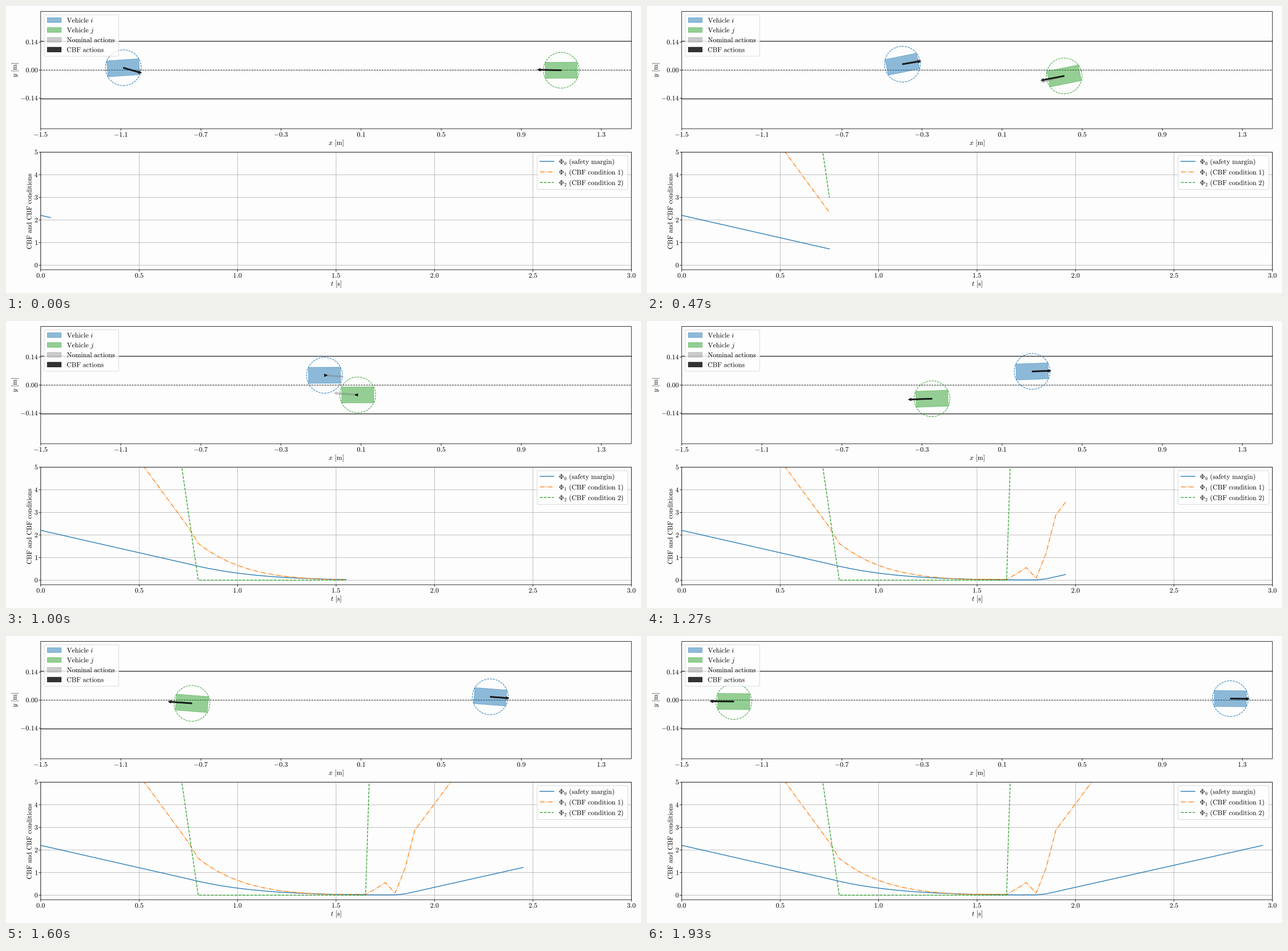
A matplotlib script for the animation above (2000 ms loop, 1112 px wide and 503 px high).

```python
import numpy as np
import matplotlib.pyplot as plt
from matplotlib.animation import FuncAnimation
from matplotlib.patches import FancyBboxPatch, PathPatch, Polygon, Rectangle
from matplotlib.textpath import TextPath
from matplotlib.transforms import Affine2D

plt.rcParams["mathtext.fontset"] = "cm"
plt.rcParams["path.snap"] = False

W, H = 1112, 503
LEFT, RIGHT = 60.8, 1095.2
ROAD_TOP, ROAD_MID, ROAD_BOTTOM = 9.5, 112.3, 215.1
PLOT_TOP, PLOT_BOTTOM = 256.2, 462.2
SCALE = (RIGHT - LEFT) / 2.95          # pixels per metre
FONT = 11.95
BLUE, ORANGE, GREEN = "tab:blue", "tab:orange", "tab:green"
BACK = "#fdfdfd"

# One drawing area in pixels, y pointing down; 72 dpi makes 1 pt = 1 px.
fig = plt.figure(figsize=(W / 72, H / 72), dpi=72, facecolor=BACK)
ax = fig.add_axes([0, 0, 1, 1])
ax.set(xlim=(0, W), ylim=(H, 0))
ax.axis("off")


def road_x(m):
    return LEFT + (m + 1.5) * SCALE


def road_y(m):
    return ROAD_MID - m * SCALE


def plot_x(t):
    return LEFT + t * (RIGHT - LEFT) / 3


def plot_y(v):
    return PLOT_BOTTOM - (v + 0.2) * (PLOT_BOTTOM - PLOT_TOP) / 5.2


def line(x, y, color="black", lw=0.8, **kw):
    return ax.plot(x, y, color=color, lw=lw, **kw)[0]


def label(x, y, text, align=0.5, baseline=False, rotation=0, zorder=4):
    """Place text by its ink box: align 0 is left, 1 is right."""
    path = TextPath((0, 0), f"${text}$", size=FONT)
    box = path.get_extents()
    dy = 0 if baseline else (box.y0 + box.y1) / 2
    move = Affine2D().translate(-box.x0 - align * box.width, -dy)
    move.rotate_deg(rotation).scale(1, -1).translate(x, y)
    ax.add_patch(PathPatch(path.transformed(move), fc="black", lw=0, zorder=zorder))


def rm(text):
    return r"\mathrm{" + text.replace(" ", r"\ ") + "}"


def x_tick(x, bottom, text):
    line([x, x], [bottom, bottom + 3], zorder=4)
    label(x, bottom + 10, text)


def y_tick(y, text):
    line([LEFT - 3, LEFT], [y, y], zorder=4)
    label(55.3, y, text, align=1)


def frame(top, bottom):
    ax.add_patch(Rectangle((LEFT, top), RIGHT - LEFT, bottom - top,
                           fill=False, lw=0.8, zorder=5))


def legend_box(x, y, w, h):
    ax.add_patch(FancyBboxPatch((x, y), w, h, boxstyle="round,pad=0,rounding_size=2.4",
                                fc="white", ec="#cccccc", lw=0.86, alpha=0.8, zorder=6))


# Static scenery
for m in (-0.144, 0.144):
    line([LEFT, RIGHT], [road_y(m)] * 2, lw=1.1)
line([LEFT, RIGHT], [ROAD_MID] * 2, lw=0.86, ls="--")
for k in range(8):
    m = -1.5 + 0.4 * k
    x_tick(road_x(m), ROAD_BOTTOM, f"{m:.1f}")
for m in (0.14, 0.0, -0.14):
    y_tick(road_y(m), f"{m:.2f}")
for k in range(7):
    x = plot_x(k / 2)
    line([x, x], [PLOT_TOP, PLOT_BOTTOM], "#b0b0b0", zorder=1)
    x_tick(x, PLOT_BOTTOM, f"{k / 2:.1f}")
for v in range(6):
    line([LEFT, RIGHT], [plot_y(v)] * 2, "#b0b0b0", zorder=1)
    y_tick(plot_y(v), str(v))
frame(ROAD_TOP, ROAD_BOTTOM)
frame(PLOT_TOP, PLOT_BOTTOM)
label(578, 240.3, "x" + rm(" [m]"))
label(578, 487.5, "t" + rm(" [s]"))
label(15.5, 112.5, "y" + rm(" [m]"), rotation=90)
label(40.5, 360, rm("CBF and CBF conditions"), rotation=90)

legend_box(67, 15.3, 130.3, 72.7)
patch_rows = [(rm("Vehicle ") + "i", BLUE, 0.5), (rm("Vehicle ") + "j", GREEN, 0.5),
              (rm("Nominal actions"), "gray", 0.4), (rm("CBF actions"), "black", 0.8)]
for k, (text, color, alpha) in enumerate(patch_rows):
    base = 29 + 17.2 * k
    ax.add_patch(Rectangle((72.3, base - 8.4), 24.4, 8.4, color=color,
                           alpha=alpha, lw=0.86, zorder=7))
    label(106.8, base, text, align=0, baseline=True, zorder=7)

legend_box(930, 262.3, 159, 59.2)
STYLES = [(BLUE, "-"), (ORANGE, "-."), (GREEN, "--")]
names = ["safety margin", "CBF condition 1", "CBF condition 2"]
for k, (name, (color, ls)) in enumerate(zip(names, STYLES)):
    base = 276.7 + 18.5 * k
    line([935, 959.5], [base - 4.4] * 2, color, 1.3, ls=ls, zorder=7)
    label(969, base, rf"\Phi_{k}" + rm(f" ({name})"), align=0, baseline=True, zorder=7)


# Plotted conditions
BRAKE, CRUISE = 0.75, 0.985            # start of braking (s), free speed (m/s)


def margin(t):
    s = t - BRAKE
    approach = np.where(s < 0, 0.72 - 1.98 * s,
                        0.72 * np.exp(-3.05 * s - 1.15 * s * s))
    leave = 0.252 + 1.95 * (t - 1.95)
    return np.maximum(np.maximum(approach, leave), 0.015)


def condition_1(t):
    rate = (margin(t) - margin(t - 0.05)) / 0.05
    bump = np.interp(t, [1.65, 1.75, 1.8], [0, 0.47, 0])
    return np.maximum(rate + 6 * margin(t), 0.04) + bump


def condition_2(t):
    return np.maximum(0, np.maximum(60 * (0.8 - t), 274 * (t - 1.65)))


CONDITIONS = [margin, condition_1, condition_2]


# Motion
def sigmoid(u):
    return 1 / (1 + np.exp(-u))


def travel(t):
    """Forward position: cruise, slow down before the other car, drive on."""
    s = t - BRAKE
    if s < -0.01:
        return -0.398 + CRUISE * s
    reach = 0.353
    slow = -0.398 + reach * (1 - np.exp(-CRUISE * s / reach))
    return max(slow, 0.25 + 0.99 * (t - 1.95))


def lateral(t, swerve):
    """Settle on the centre line, dodge in two stages, return in two."""
    stages = [(-0.0125 * swerve, 0.25, 0.08), (0.0485, 0.72, 0.07),
              (0.0225, 1.77, 0.06), (-0.05, 2.2, 0.07), (-0.0145, 2.5, 0.15)]
    return 0.0125 * swerve + sum(a * sigmoid((t - c) / w) for a, c, w in stages)


def motion(t, swerve):
    slope = (lateral(t - 0.05, swerve) - lateral(t - 0.07, swerve)) / 0.02
    tilt = 1.2 * np.degrees(np.arctan(slope / CRUISE))
    heading = tilt + 7 * swerve * np.exp(-t / 0.1)
    wobble = -20 * swerve * np.exp(-t / 0.3) * np.cos(np.pi * t / 0.4)
    safe = nominal = 0.95 * tilt + wobble
    speed, s = 1, t - BRAKE
    if -0.01 < s < 0.85:
        speed = max(0, 1.13 * np.exp(-CRUISE * s / 0.353) - 0.13)
        nominal = safe + 4.5 * np.cos(np.pi * s / 0.8)
    return travel(t), lateral(t, swerve), heading, nominal, safe, speed


def place(points, x, y, degrees):
    """Turn local points (y up) and move them to a pixel position."""
    c, s = np.cos(np.radians(degrees)), np.sin(np.radians(degrees))
    px, py = np.array(points).T
    return np.column_stack([x + px * c - py * s, y - px * s - py * c])


def arrow(shaft):
    return [(0, 1), (shaft, 1), (shaft, 2.4), (shaft + 5, 0),
            (shaft, -2.4), (shaft, -1), (0, -1)]


class Vehicle:
    BODY = np.array([(-1, -.5), (1, -.5), (1, .5), (-1, .5)]) * 0.08 * SCALE
    TURN = np.linspace(-0.5, 1.5, 91) * np.pi
    RING = np.column_stack([np.cos(TURN), np.sin(TURN)]) * np.hypot(.08, .04) * SCALE

    def __init__(self, color, shaft, turn):
        self.shaft, self.turn = shaft, turn
        self.body = self.shape(color, 0.5)
        self.ring = ax.add_patch(Polygon(self.RING, fill=False, ec=color,
                                         ls="--", lw=0.95, zorder=3))
        self.nominal = self.shape("gray", 0.4)
        self.safe = self.shape("black", 0.8)

    def shape(self, color, alpha):
        return ax.add_patch(Polygon(self.BODY, color=color, alpha=alpha, lw=0.86, zorder=3))

    def pose(self, x, y, heading, nominal, safe, speed):
        x, y = road_x(x), road_y(y)
        self.ring.set_xy(place(self.RING, x, y, 0))
        self.body.set_xy(place(self.BODY, x, y, heading))
        self.nominal.set_xy(place(arrow(self.shaft), x, y, nominal + self.turn))
        self.safe.set_xy(place(arrow(self.shaft * speed), x, y, safe + self.turn))


car_i = Vehicle(BLUE, 28, 0)
car_j = Vehicle(GREEN, 36.5, 180)
window = Rectangle((LEFT, PLOT_TOP), RIGHT - LEFT, PLOT_BOTTOM - PLOT_TOP,
                   transform=ax.transData)
curves = [line([], [], color, 1.3, ls=ls, zorder=3) for color, ls in STYLES]
for curve in curves:
    curve.set_clip_path(window)

FRAMES, INTERVAL, STEPS = 100, 20, 30
STARTS = np.round(np.arange(STEPS) * 200 / STEPS) * 10


def update(n):
    # The picture holds for 60 or 70 ms, then jumps 0.1 s ahead.
    step = np.searchsorted(STARTS, n * INTERVAL + INTERVAL / 2, side="right") - 1
    t = 0.05 + 0.1 * step
    car_i.pose(*motion(t, swerve=1))
    # Vehicle j mirrors i, but starts slightly behind and almost straight.
    x, y, *action = motion(t, swerve=0.08)
    car_j.pose(0.012 * sigmoid((1.2 - t) / 0.1) - x, -y, *action)
    times = np.arange(0, t + 0.025, 0.05)
    for curve, condition in zip(curves, CONDITIONS):
        curve.set_data(plot_x(times), plot_y(condition(times)))
    return curves


anim = FuncAnimation(fig, update, frames=FRAMES, interval=INTERVAL, repeat=True,
                     repeat_delay=0, blit=False)
plt.show()
```
